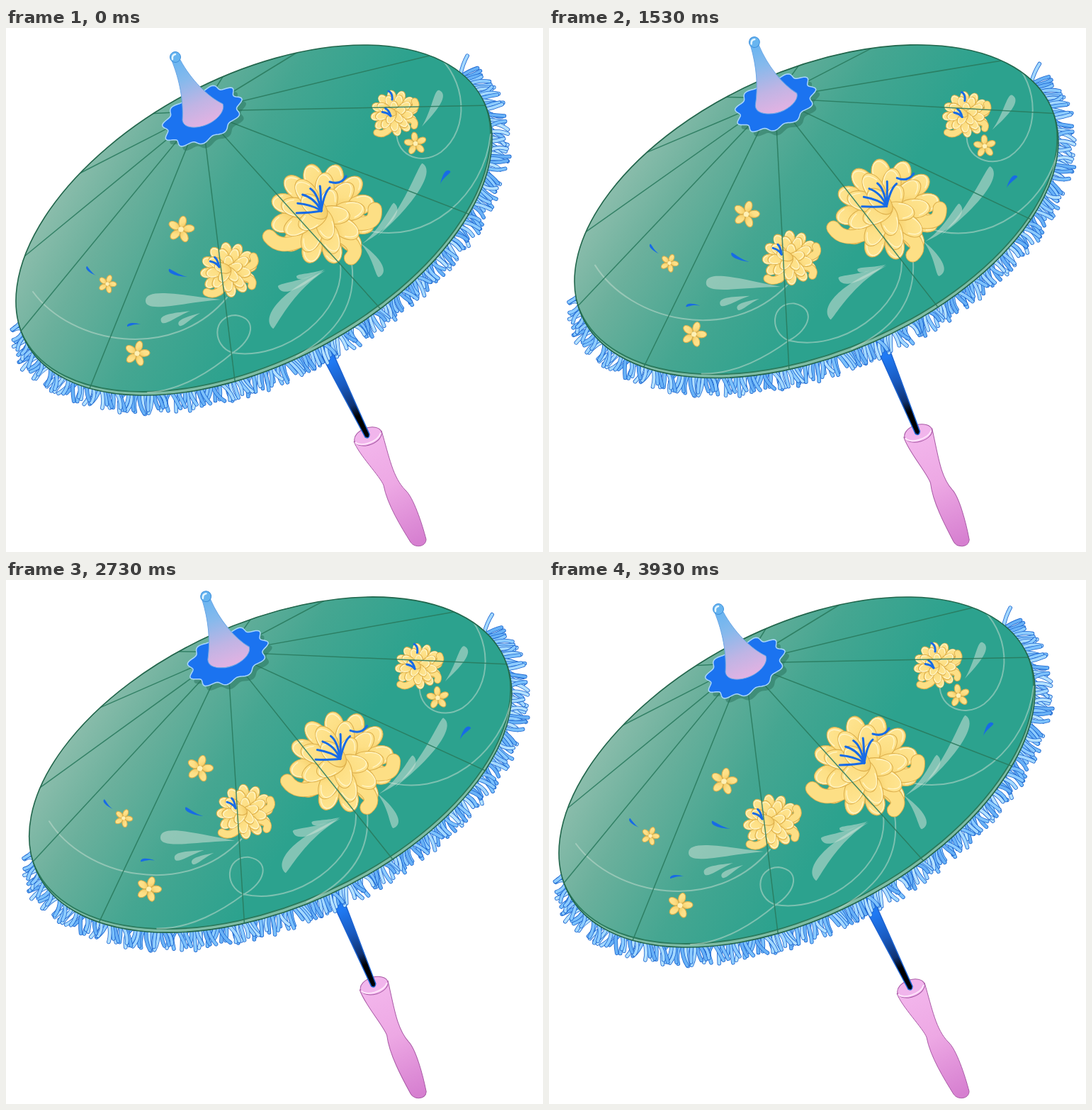
Write an HTML page that moves like this. It is 758 px wide and 739 px high and loops after 4000 ms.

```html
<!DOCTYPE html>
<html lang="en">
<head>
<meta charset="utf-8">
<title>Parasol</title>
<style>
  html, body { margin: 0; width: 100%; height: 100%; overflow: hidden; background: #fff; }
  svg { display: block; width: 100%; height: 100%; }
  .leaf { fill: #d3e4d8; opacity: .52; }
  .speck { fill: #176be6; }
  .stem { fill: none; stroke: #c5ddd0; stroke-width: 2; opacity: .52; stroke-linecap: round; }
  .rib { fill: none; stroke: #2a7a5e; stroke-width: 1.5; opacity: .88; }
  .blue { fill: none; stroke: #176be6; stroke-width: 3; stroke-linecap: round; }
  .petal { fill: url(#petalFill); stroke: #deb04c; stroke-width: 1.1; }
  .shine { fill: none; stroke: #fff4c4; stroke-width: 1.4; stroke-dasharray: 44 56; stroke-linecap: round; }
  .curl { fill: none; stroke-linecap: round; }
  .edge { fill: none; stroke: #22664c; stroke-width: 1.6; }
</style>
</head>
<body>
<svg viewBox="0 0 758 739">
  <defs>
    <linearGradient id="silk" gradientUnits="userSpaceOnUse" x1="-220" y1="-180" x2="-30" y2="120">
      <stop offset="0" stop-color="#90bfae"/><stop offset=".28" stop-color="#6bb09c"/>
      <stop offset=".62" stop-color="#45a691"/><stop offset="1" stop-color="#2ca28e"/>
    </linearGradient>
    <linearGradient id="petalFill" x1="0" y1="0" x2=".5" y2="1">
      <stop offset="0" stop-color="#ffe694"/><stop offset=".65" stop-color="#fddf85"/><stop offset="1" stop-color="#f5cf6b"/>
    </linearGradient>
    <linearGradient id="spire" gradientUnits="userSpaceOnUse" x1="240" y1="38" x2="282" y2="136">
      <stop offset="0" stop-color="#62b4f2"/><stop offset=".35" stop-color="#86b9ec"/>
      <stop offset=".7" stop-color="#c0b4e4"/><stop offset="1" stop-color="#e2b2e2"/>
    </linearGradient>
    <linearGradient id="rod" gradientUnits="userSpaceOnUse" x1="458" y1="472" x2="507" y2="574">
      <stop offset="0" stop-color="#1f7af4"/><stop offset=".32" stop-color="#1a5abf"/>
      <stop offset=".6" stop-color="#0f3272"/><stop offset=".75" stop-color="#000"/>
    </linearGradient>
    <linearGradient id="grip" gradientUnits="userSpaceOnUse" x1="505" y1="580" x2="580" y2="728">
      <stop offset="0" stop-color="#f3b6ec"/><stop offset=".45" stop-color="#eda8e4"/><stop offset="1" stop-color="#d67fd0"/>
    </linearGradient>
    <clipPath id="rimClip"><ellipse id="rim" rx="365" ry="201.7" transform="translate(350 271) rotate(-27.95)"/></clipPath>
  </defs>

  <g id="handle">
    <path d="M491 583C498 602 528 632 533 645 538 672 558 704 571 725 577 734 593 732 593 721 587 698 575 662 564 652 546 634 541 605 530 568Z" fill="url(#grip)" stroke="#a95ba6"/>
    <ellipse cx="511" cy="576" rx="20" ry="12" transform="rotate(-20 511 576)" fill="#f1b5ec" stroke="#a95ba6"/>
    <path d="M493 584C500 592 525 584 529 571" fill="none" stroke="#ffe6fb" stroke-width="2"/>
    <path d="M434 440L451 435 513 573Q513 580 507 577Z" fill="url(#rod)" stroke="#1c63d2" stroke-width="1.5"/>
  </g>

  <g id="canopy">
    <g id="fringe" fill="none" stroke-linecap="round"></g>
    <use href="#rim" fill="#7fbda6"/>
    <g clip-path="url(#rimClip)">
      <use href="#rim" x="-2" y="-5" fill="url(#silk)" stroke="#2a7a5c" stroke-width="1.8"/>
      <g id="art"></g>
    </g>
    <use href="#rim" class="edge"/>
    <g id="crown">
      <path id="ruffle" fill="#1b73f0" stroke="#a9d6ff" stroke-width="1.5"/>
      <g id="tip">
        <path d="M234 46C242 66 251 96 249 130 251 144 275 142 290 133 303 125 309 114 306 107 285 97 261 73 246 45Z" fill="url(#spire)" stroke="#6ba7e6"/>
        <circle cx="239" cy="41" r="7.5" fill="#68b5f0" stroke="#3d8fdc"/>
        <path d="M235 44Q234 38 239 37" fill="none" stroke="#e6f6ff" stroke-width="2.5" stroke-linecap="round"/>
      </g>
    </g>
  </g>
</svg>
<script>
const $ = id => document.getElementById(id);
const repeat = (n, draw) => Array.from({ length: n }, (_, i) => draw(i)).join('');
const rad = deg => deg * Math.PI / 180;
const line = (cls, d) => `<path class="${cls}" d="${d}"/>`;
const center = { x: 350, y: 271 }, tilt = rad(-27.95);
const turn = (x, y) => [x * Math.cos(tilt) - y * Math.sin(tilt), x * Math.sin(tilt) + y * Math.cos(tilt)];

let seed = 7;
const rand = () => (seed = seed * 16807 % 2147483647) / 2147483647;

// Threads follow the rim's outward normal, pulled slightly down.
function fringe() {
  const A = 365, B = 201.7, first = -.23, last = 3.29;
  const tints = ['#7cc1fb', '#a3d8ff', '#8dccff', '#68b1f6', '#b4e1ff'];
  let out = '';
  for (let a = first; a < last; a += 4.2 / Math.hypot(A * Math.sin(a), B * Math.cos(a))) {
    const [rx, ry] = turn(A * Math.cos(a), B * Math.sin(a));
    const [nx, ny] = turn(B * Math.cos(a), A * Math.sin(a));
    const dir = Math.atan2(ny + 45, nx) + rand() - .5;
    const end = Math.min(1, .5 + 2 * (last - a));
    const len = (17 + 10 * rand()) * end, bend = (rand() - .5) * 11;
    const ux = Math.cos(dir), uy = Math.sin(dir);
    const d = `M${center.x + rx - ux * 3} ${center.y + ry - uy * 3}` +
      `q${ux * len * .6 - uy * bend} ${uy * len * .6 + ux * bend} ${ux * (len + 3)} ${uy * (len + 3)}`;
    const tint = tints[Math.floor(rand() * tints.length)];
    out += `<path d="${d}" stroke="#1c66d0" stroke-width="5.6"/><path d="${d}" stroke="${tint}" stroke-width="4"/>`;
  }
  return out;
}

const petal = (x, y, rx, ry, rot) =>
  `<g transform="translate(${x} ${y}) rotate(${rot})"><ellipse class="petal" rx="${rx}" ry="${ry}"/>` +
  `<ellipse class="shine" rx="${rx * .82}" ry="${ry * .87}" pathLength="100" transform="rotate(170)"/></g>`;

// Rings of petals from outside in, with three long curls below.
function flower(x, y, r, rot) {
  const ring = (n, reach, w, h, from) => repeat(n, i => {
    const deg = from + i * 360 / n, a = rad(deg);
    return petal(r * reach * Math.sin(a), -r * reach * .95 * Math.cos(a), r * w, r * h, deg);
  });
  const curl = (x0, y0, cx, cy, x1, y1) => {
    const d = `M${x0 * r} ${y0 * r}Q${cx * r} ${cy * r} ${x1 * r} ${y1 * r}`;
    return `<path class="curl" d="${d}" stroke="#deb04c" stroke-width="${r * .23 + 2}"/>` +
      `<path class="curl" d="${d}" stroke="#fddf85" stroke-width="${r * .23}"/>`;
  };
  return `<g transform="translate(${x} ${y}) rotate(${rot})">` +
    ring(12, .68, .17, .25, 16) +
    curl(-.35, .45, -.75, .65, -.94, .4) + curl(.5, .15, .95, .25, .92, -.08) + curl(.35, .4, .68, .6, .5, .78) +
    ring(9, .46, .17, .29, 4) + ring(5, .2, .16, .28, 24) + '</g>';
}

const blossom = (x, y, r, rot) => `<g transform="translate(${x} ${y}) rotate(${rot})">` +
  repeat(5, i => `<ellipse class="petal" cy="${-r * .58}" rx="${r * .27}" ry="${r * .42}" transform="rotate(${i * 72})"/>`) +
  `<circle r="${r * .2}" fill="#fff0b4"/></g>`;

const stamens = (x, y, n, from, to, len) => repeat(n, i => {
  const a = rad(from + (to - from) * i / (n - 1)), sx = Math.sin(a) * len, sy = -Math.cos(a) * len;
  return line('blue', `M${x} ${y}q${sx * .35} ${sy * .8} ${sx} ${sy}`);
});

// A drop from its thin tail to its round head, bowed sideways.
function drop(cls, x0, y0, x1, y1, bow, w) {
  const dx = x1 - x0, dy = y1 - y0, l = Math.hypot(dx, dy);
  const at = (t, side) => `${x0 + dx * t - dy / l * side} ${y0 + dy * t + dx / l * side}`;
  return line(cls, `M${x0} ${y0}C${at(.5, bow + w * .3)} ${at(1, bow * .6 + w * 1.1)} ${x1} ${y1}` +
    `C${at(1, bow * .6 - w * 1.1)} ${at(.5, bow - w * .3)} ${x0} ${y0}Z`);
}

const leaves = [
  [525, 293, 588, 191, 15, 13], [503, 304, 548, 247, 12, 11], [500, 303, 527, 351, -10, 11],
  [451, 342, 377, 424, 20, 14], [450, 340, 384, 365, -10, 11], [448, 341, 410, 351, -3, 6],
  [303, 383, 197, 385, 2, 17], [260, 399, 219, 414, 2, 9], [274, 402, 244, 419, 2, 7],
  [587, 139, 612, 88, 6, 11]
].map(l => drop('leaf', ...l));

const specks = [
  [127, 349, 114, 336, -3, 3], [256, 351, 230, 340, -4, 4],
  [191, 418, 171, 421, 4, 3], [613, 220, 627, 202, -4, 5]
].map(s => drop('speck', ...s));

const stems = [
  'M606 36C650 72 656 142 614 175 584 196 546 178 552 140',
  'M684 150C675 237 594 307 508 285',
  'M472 334C479 400 395 470 320 458 291 449 290 406 324 405 356 409 349 440 320 458 293 481 248 512 200 514',
  'M488 332C496 390 466 432 410 463',
  'M38 372C92 446 235 472 312 380'
].map(d => line('stem', d));

const ribEnds = '410 35,598 39,690 109,660 265,534 402,324 505,117 511,18 431,20 327,100 207,200 121,309 64';

// Eleven waves around a tilted oval.
const wave = 'M' + repeat(132, i => {
  const a = i * Math.PI / 66, r = 1 + .075 * Math.sin(11 * a);
  const [x, y] = turn(57 * r * Math.cos(a), 34 * r * Math.sin(a));
  return `${277 + x} ${124 + y} `;
}) + 'Z';

$('art').innerHTML = [
  ...stems, ...leaves,
  flower(447, 262, 80, 0), flower(314, 341, 43, -23), flower(548, 120, 36, -25),
  blossom(247, 284, 19, 12), blossom(143, 361, 13, 20), blossom(185, 459, 18, 15), blossom(578, 163, 16, -8),
  stamens(445, 258, 6, -95, 20, 35), stamens(301, 337, 2, -58, -25, 15), stamens(543, 124, 2, -65, -35, 13),
  line('blue', 'M457 217Q473 222 480 209M540 89Q546 92 545 101'),
  ...specks,
  ...ribEnds.split(',').map(end => line('rib', `M276 117L${end}`)),
  `<path d="${wave}" fill="#256b55" opacity=".45" transform="translate(6 6)"/>`
].join('');
$('ruffle').setAttribute('d', wave);
$('fringe').innerHTML = fringe();

const move = (id, value) => $(id).setAttribute('transform', value);
const STEPS = 60, PEAK = 31, REST = 59;

// Fifteen pictures a second: a slower lean right, a quicker return, one step of rest.
function draw() {
  const step = Math.floor((performance.now() % 4000 + 6.7) * .015) % STEPS;
  const x = step < PEAK ? step / PEAK : (REST - step) / (REST - PEAK);
  const p = x * x * (3 - 2 * x);
  move('handle', `rotate(${4.65 * p} 582 725)`);
  move('canopy', `translate(${center.x + 32.9 * p} ${center.y - 14.8 * p}) ` +
    `matrix(${1 - .0106 * p} ${.088 * p} ${-.0848 * p} ${1 - .0085 * p} 0 0) translate(${-center.x} ${-center.y})`);
  const drift = `translate(${4.7 * p} ${-2 * p})`;
  move('art', drift);
  move('crown', drift);
  move('tip', `rotate(${1.7 * p} 276 125)`);
  requestAnimationFrame(draw);
}
draw();
</script>
</body>
</html>
```
